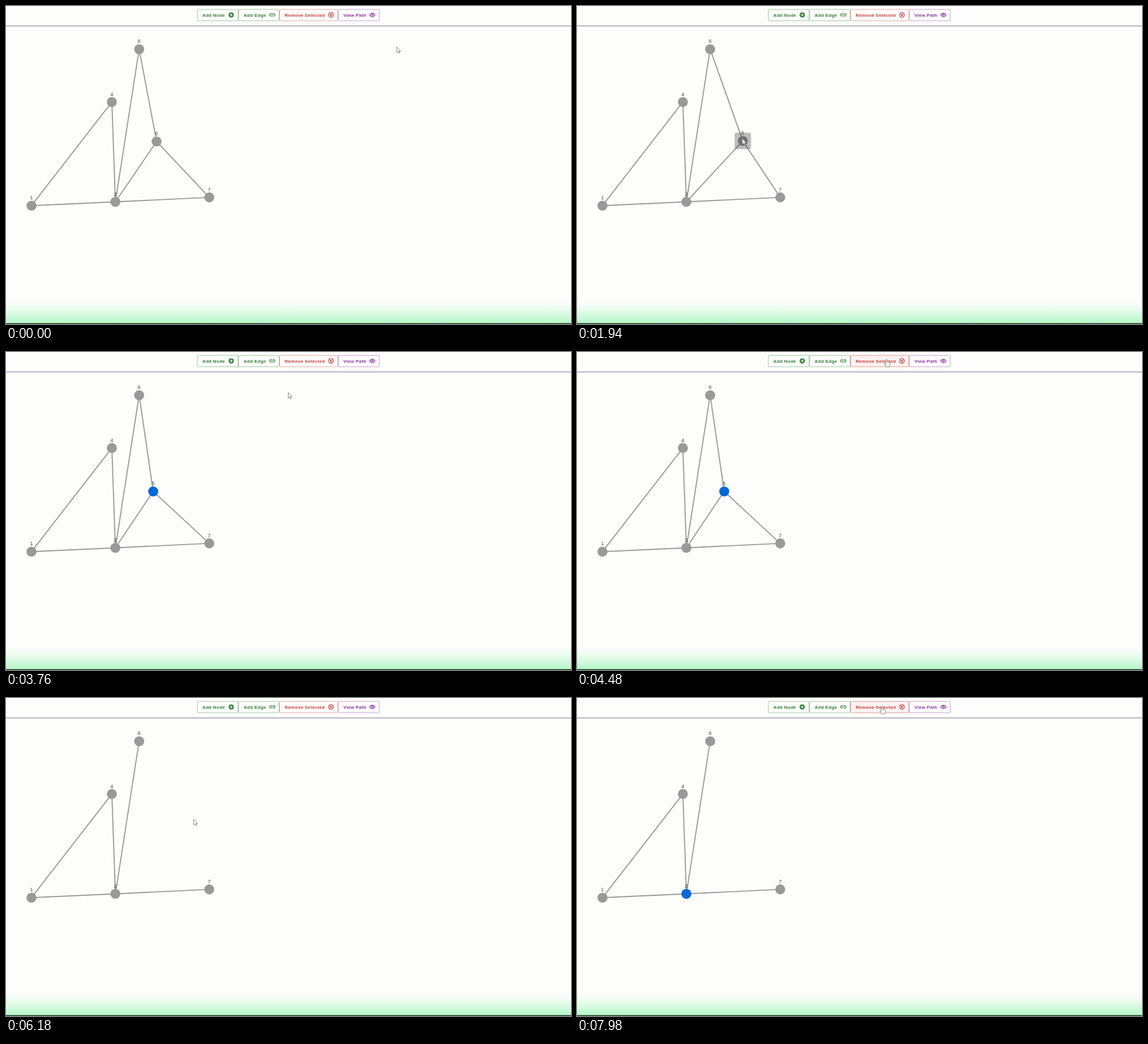
Recreate the animation shown at these times as an HTML page. Size 998 by 561 pixels, loop 8000 ms.

```html
<!DOCTYPE html>
<html lang="en">
<head>
<meta charset="utf-8">
<title>Graph editor</title>
<style>
  html, body { margin: 0; width: 100%; height: 100%; overflow: hidden; background: #fdfdfc; }
  svg { display: block; width: 100%; height: 100%; }
  text { font-family: "Liberation Sans", Arial, sans-serif; }
  .button { font-size: 8px; font-weight: 700; letter-spacing: .32px; }
  .button rect { stroke: currentColor; stroke-opacity: .45; fill: currentColor; fill-opacity: 0; }
  .button.hover rect { stroke-opacity: .5; fill-opacity: .05; }
  .button text { fill: currentColor; }
  .icon { fill: none; stroke: currentColor; stroke-width: 1.1; stroke-linecap: round; }
  .edge { stroke: #999; stroke-width: 1.9; }
  .node { fill: #999; }
  .node.selected { fill: #0169d9; }
  .label { font-size: 9.5px; fill: #484848; text-anchor: middle; }
  .cursor { fill: #fff; stroke: #666; stroke-width: .8; stroke-linejoin: round; }
</style>
</head>
<body>
<svg viewBox="0 0 998 561" preserveAspectRatio="none">
  <defs>
    <linearGradient id="glow" x1="0" y1="0" x2="0" y2="1">
      <stop offset="0" stop-color="#b4f8c8" stop-opacity="0"/>
      <stop offset=".35" stop-color="#b4f8c8" stop-opacity=".22"/>
      <stop offset="1" stop-color="#b4f8c8"/>
    </linearGradient>
  </defs>
  <rect width="998" height="561" fill="#fdfdfc"/>
  <rect y="520" width="998" height="40" fill="url(#glow)"/>
  <rect y="559.6" width="998" height="1.4" fill="#17251c"/>
  <rect y="34.5" width="998" height="1.2" fill="#82828f"/>
  <rect y="35.7" width="998" height="1.8" fill="#ececf2"/>
  <g id="toolbar"></g>
  <g id="edges"></g>
  <g id="nodes"></g>
  <rect id="overlay" x="-14.5" y="-14.5" width="29" height="29" rx="3.5" fill-opacity=".25"/>
  <g id="labels"></g>
  <path id="arrow" class="cursor" d="M0 0V10L2.4 8L4.1 11.3L5.6 10.6L4 7.4H7Z"/>
  <path id="hand" class="cursor" d="M-1 1Q0-1 1 1V5L5 6Q6 6.3 6 8V10Q5.5 12 4.5 13.5H-1L-4 8.5Q-3.5 6.7-1 9Z"/>
</svg>
<script>
const LOOP = 8000;
const DRAG = { from: 1200, to: 2920, lag: 40 };
const PRESS = { from: 6640, to: 6760 };
const REMOVE_AT = 5460;

const byId = id => document.getElementById(id);
const show = (el, visible) => { el.style.display = visible ? "" : "none"; };
const during = (span, t) => t >= span.from && t < span.to;

function set(el, attrs) {
  for (const key in attrs) el.setAttribute(key, attrs[key]);
  return el;
}

function add(parent, tag, attrs, content = "") {
  const el = set(document.createElementNS("http://www.w3.org/2000/svg", tag), attrs);
  el.textContent = content;
  return parent.appendChild(el);
}

const moveTo = (el, [x, y]) => set(el, { transform: `translate(${x} ${y})` });

const icons = {
  plus(g) {
    add(g, "circle", { r: 4.6, fill: "currentColor", stroke: "none" });
    add(g, "path", { d: "M-2.4 0H2.4M0-2.4V2.4", stroke: "#fff" });
  },
  link(g) {
    add(g, "path", { d: "M-1-2.2H-2.5A2.2 2.2 0 0 0-2.5 2.2H-1M1-2.2H2.5A2.2 2.2 0 0 1 2.5 2.2H1M-1.7 0H1.7" });
  },
  cross(g) {
    add(g, "circle", { r: 4.3 });
    add(g, "path", { d: "M-1.8-1.8L1.8 1.8M1.8-1.8L-1.8 1.8" });
  },
  eye(g) {
    add(g, "path", { d: "M-4.8 0Q0-6.4 4.8 0Q0 6.4-4.8 0Z" });
    add(g, "circle", { r: 1.4 });
  }
};

// Buttons sit side by side, each as wide as its text plus room for the icon.
let right = 337.5;
const buttons = [
  ["Add Node", "#2e7d32", "plus"],
  ["Add Edge", "#2e7d32", "link"],
  ["Remove Selected", "#c93535", "cross"],
  ["View Path", "#842c9d", "eye"]
].map(([name, color, icon]) => {
  const left = right;
  const el = add(byId("toolbar"), "g", { class: "button", color });
  const frame = add(el, "rect", { x: left + .5, y: 6, height: 20, rx: 2 });
  const text = add(el, "text", { x: left + 9.3, y: 18.8 }, name);
  right += text.getComputedTextLength() + 32.6;
  set(frame, { width: right - left - 1 });
  icons[icon](moveTo(add(el, "g", { class: "icon" }), [right - 12.6, 15.8]));
  return { el, left, right };
});

const nodes = Object.entries({
  1: [45, 352.2], 2: [193.2, 345.5], 4: [187, 169.4], 5: [266, 239], 6: [235.2, 76.2], 7: [359, 337.6]
}).map(([id, home]) => ({
  id, home, at: home,
  dot: add(byId("nodes"), "circle", { class: "node", r: 8.8 }),
  label: add(byId("labels"), "text", { class: "label", y: -10.8 }, id)
}));
const nodeById = Object.fromEntries(nodes.map(n => [n.id, n]));
const [hub, dragged] = [nodeById[2], nodeById[5]];
const edges = ["14", "42", "12", "26", "65", "25", "57", "27"].map(pair => ({
  ends: [...pair].map(id => nodeById[id]),
  el: add(byId("edges"), "line", { class: "edge" })
}));

const removeButton = [547, 12.5];
const route = [
  [0, [690, 72]],
  [820, [648, 86]],
  [DRAG.from, [266, 235]],
  [1280, [278, 228]],
  [1940, [292, 234]],
  [2400, [152, 230]],
  [2880, [259, 242]],
  [3760, [498.5, 71.5]],
  [4500, removeButton],
  [5580, removeButton],
  [6180, [331.5, 214]],
  [PRESS.from, [194, 342]],
  [7800, [539, 14.5]]
];

function cursorAt(t) {
  const next = route.findIndex(([time]) => time > t);
  if (next < 0) return route.at(-1)[1];
  const [t0, a] = route[next - 1], [t1, b] = route[next];
  const p = (t - t0) / (t1 - t0), eased = p * p * (3 - 2 * p);
  return a.map((v, i) => v + (b[i] - v) * eased);
}

// The dragged node trails the cursor slightly and stays where it is released.
function draggedAt(t) {
  if (t < DRAG.from) return dragged.home;
  const held = Math.min(Math.max(t - DRAG.lag, DRAG.from), DRAG.to - DRAG.lag);
  const [x, y] = cursorAt(held);
  return [x + 1, y + 4];
}

function selectedAt(t) {
  if (t >= PRESS.to) return hub;
  return t >= DRAG.to && t < REMOVE_AT ? dragged : null;
}

function render(t) {
  const alive = node => node !== dragged || t < REMOVE_AT;
  const selected = selectedAt(t);
  dragged.at = draggedAt(t);

  for (const { ends, el } of edges) {
    const [[x1, y1], [x2, y2]] = ends.map(n => n.at);
    set(el, { x1, y1, x2, y2 });
    show(el, ends.every(alive));
  }
  for (const node of nodes) {
    node.dot.classList.toggle("selected", node === selected);
    for (const el of [node.dot, node.label]) {
      moveTo(el, node.at);
      show(el, alive(node));
    }
  }

  const pressed = during(DRAG, t) ? dragged : during(PRESS, t) ? hub : null;
  show(byId("overlay"), pressed);
  if (pressed) moveTo(byId("overlay"), pressed.at);

  const [x, y] = cursorAt(t);
  const isOver = b => y > 6 && y < 26 && x >= b.left && x < b.right;
  for (const b of buttons) b.el.classList.toggle("hover", isOver(b));
  const pointer = buttons.some(isOver) ? "hand" : "arrow";
  for (const id of ["arrow", "hand"]) {
    moveTo(byId(id), [x, y]);
    show(byId(id), id === pointer);
  }
}

const start = performance.now();
function tick() {
  render((performance.now() - start) % LOOP);
  requestAnimationFrame(tick);
}
tick();
</script>
</body>
</html>
```
